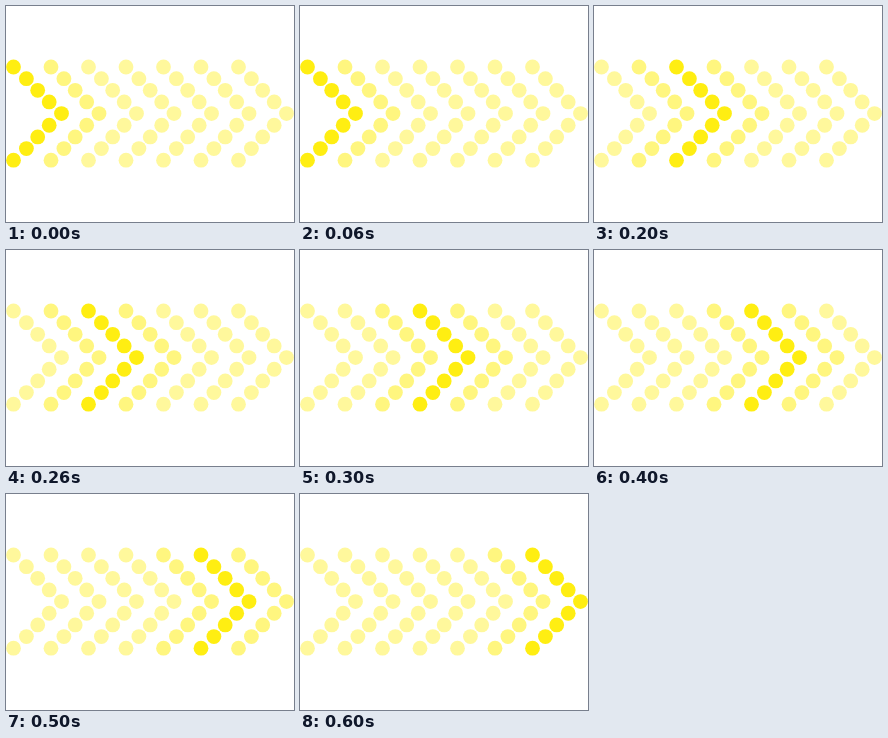
Recreate the animation shown at these times as an HTML page with a canvas. Size 288 by 216 pixels, loop 700 ms.

```html
<!DOCTYPE html>
<html lang="en">
<head>
<meta charset="utf-8">
<title>Running chevrons</title>
<style>
html, body { margin: 0; width: 100%; height: 100%; overflow: hidden; background: #fff; }
canvas { display: block; width: 288px; height: 216px; }
</style>
</head>
<body>
<canvas id="stage" width="288" height="216"></canvas>
<script>
const ctx = document.getElementById('stage').getContext('2d');
const COUNT = 7, STEP = 100, GAP = 37.5, RADIUS = 7.4;
const MID = 107.6, ROW = 11.65;
const INDENT = [48, 35.7, 24.2, 12.9, 0]; // x by rows away from the tip

function dot(x, y) {
  ctx.beginPath();
  ctx.arc(x, y, RADIUS, 0, Math.PI * 2);
  ctx.fill();
}

function chevron(x, alpha) {
  ctx.globalAlpha = alpha;
  for (let row = -4; row <= 4; row++) {
    dot(x + INDENT[Math.abs(row)], MID + row * ROW);
  }
}

function glow(distance) {
  if (distance === 0) return 1;
  return distance === 1 ? 0.54 : 0.42;
}

function draw(time) {
  const lit = Math.floor(time / STEP) % COUNT;
  ctx.globalAlpha = 1;
  ctx.fillStyle = '#fff';
  ctx.fillRect(0, 0, 288, 216);
  ctx.fillStyle = '#ffee12';
  for (let i = 0; i < COUNT; i++) {
    chevron(7.5 + i * GAP, glow(Math.abs(i - lit)));
  }
}

const start = performance.now();
function tick() {
  draw(performance.now() - start);
  requestAnimationFrame(tick);
}
tick();
</script>
</body>
</html>
```
